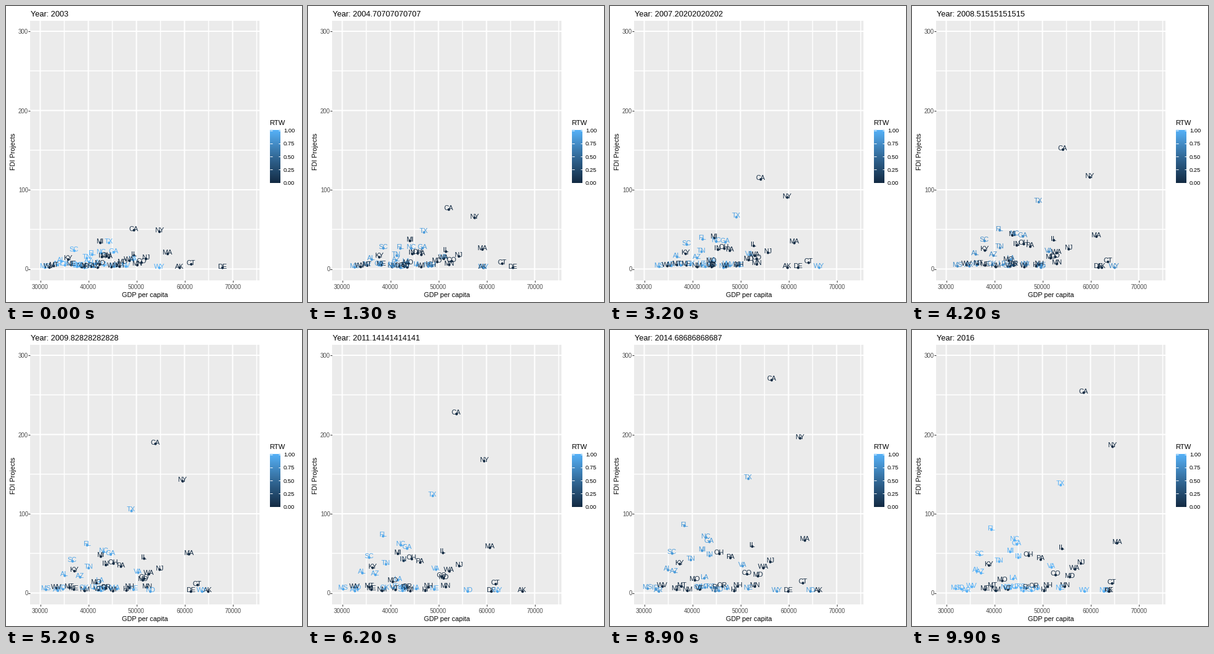
Recreate the animation shown at these times as a matplotlib script. Size 480 by 480 pixels, loop 10000 ms.

```python
import numpy as np
import matplotlib.pyplot as plt
from matplotlib.animation import FuncAnimation
from matplotlib.colors import LinearSegmentedColormap
from matplotlib.patches import Rectangle

plt.rcParams["font.family"] = "Liberation Sans"
SIZE, DPI, FRAMES = 480, 100, 100
PT = 72 / DPI  # points per pixel
FIRST, SPAN = 2003, 13
KEYS = (2003, 2007.2, 2011.14, 2013.24, 2016)

# First and last GDP per capita (thousands), first and peak projects
HUBS = {
    "CA": (49.5, 58.6, 49, 286),
    "NY": (54.8, 64.6, 47, 207),
    "TX": (44.3, 53.8, 33, 153),
    "FL": (40.8, 39.4, 18, 90),
    "NC": (42.7, 44.2, 20, 74),
    "MA": (56.5, 65.5, 19, 70),
    "GA": (45.3, 44.7, 21, 68),
    "IL": (49.5, 54.1, 17, 62),
    "MI": (42.5, 43.3, 33, 55),
    "SC": (37.1, 37.0, 23, 52),
    "CT": (61.4, 64.5, 6, 13),
}
# GDP at KEYS for states that leave the common trend
ROAMERS = {
    "AK": (59, 59.8, 67.5, 69, 63.9),
    "WY": (54.8, 66.4, 62.3, 56.3, 58.8),
    "DE": (67.9, 62, 61, 55.7, 63.8),
    "ND": (39.2, 46.5, 56.1, 66.5, 62.8),
}
# Everyone else, poorest to richest, in the first and last year
POOR_TO_RICH = (
    "MS WV MT AR AL OK KY ME ID SD UT NM OR TN AZ RI KS LA VT MO IN IA OH PA "
    "WI NE HI NH MD NV WA VA MN CO NJ".split(),
    "MS ID AR WV AL AZ ME KY MT NM TN MO NV VT OK LA UT IN KS WI RI OH SD OR "
    "IA PA HI NH VA CO NE MN MD WA NJ".split(),
)
BUSY = "OH IN PA TN NJ KY VA WA AL AZ CO MD LA MO".split()  # by peak projects

RTW_SINCE = dict.fromkeys(
    "AL AZ AR FL GA ID IA KS LA MS NE NV NC ND OK SC SD TN TX UT VA WY".split(),
    1990)
RTW_SINCE.update(IN=2012, MI=2013, WI=2015, WV=2016)

CMAP = LinearSegmentedColormap.from_list("rtw", ["#132B43", "#336A98", "#56B1F7"])


def spread(order, state, mid, slope, tail):
    u = 2 * order.index(state) / (len(order) - 1) - 1
    return mid + slope * u + tail * u ** 3


def build():
    rng = np.random.default_rng(4)
    states = {}
    for s in sorted([*HUBS, *ROAMERS, *POOR_TO_RICH[0]]):
        if s in HUBS:
            states[s] = HUBS[s]
            continue
        if s in ROAMERS:
            gdp = (0, 0)
        else:
            gdp = (spread(POOR_TO_RICH[0], s, 41.5, 7.5, 3),
                   spread(POOR_TO_RICH[1], s, 45, 9, 4))
        if s in BUSY:
            i = BUSY.index(s)
            fdi = (16 - 0.8 * i, 52 - 2.7 * i)
        else:
            fdi = (rng.uniform(1, 5), rng.uniform(1, 9))
        if s in ROAMERS:
            fdi = (1.5, 2)
        states[s] = (*gdp, *fdi)
    return states


STATES = build()


def place(state, year):
    g0, g1, f0, peak = STATES[state]
    t = (year - FIRST) / SPAN
    if state in ROAMERS:
        gdp = np.interp(year, KEYS, ROAMERS[state])
    else:
        gdp = g0 + (g1 - g0) * t + 2 * np.sin(2 * np.pi * t)  # boom and bust
    growth = np.interp(year, (2003, 2007.2, 2013.24, 2016), (0, 0.27, 1, 0.86))
    return gdp, f0 + (peak - f0) * growth


def rtw(state, year):
    level = np.clip(year - RTW_SINCE.get(state, 3000) + 1, 0, 1)
    return level * (1 - 0.5 * abs(year - round(year)))


def px(gdp):
    return 55.5 + (gdp - 30) * 7.8


def py(fdi):
    return 426.5 - fdi * 1.285


fig = plt.figure(figsize=(SIZE / DPI, SIZE / DPI), dpi=DPI, facecolor="white")
ax = fig.add_axes([0, 0, 1, 1])
ax.axis("off")


def text(x, y, s, size, color="black", ha="left", va="center", **kw):
    return ax.text(x, y, s, fontsize=size * PT, color=color, ha=ha, va=va, **kw)


def line(xs, ys, color, width=1, **kw):
    ax.plot(xs, ys, color=color, lw=width * PT, solid_capstyle="butt",
            zorder=1, **kw)


L, R, T, B = 39, 411, 24, 445
ax.add_patch(Rectangle((L, T), R - L, B - T, fc="#EBEBEB", lw=0, zorder=0))

for k in range(30, 76, 5):
    x = px(k)
    major = k % 10 == 0
    line([x, x], [T, B], "white", 2 if major else 1.5, snap=False)
    if major:
        line([x, x], [B, B + 3], "#333333")
        text(x, 456, f"{k}000", 9.7, "#4D4D4D", "center")
for n in range(0, 301, 50):
    y = py(n)
    major = n % 100 == 0
    line([L, R], [y, y], "white", 2 if major else 1.5, snap=False)
    if major:
        line([L - 3, L], [y, y], "#333333")
        text(36, y, str(n), 9.7, "#4D4D4D", "right", "center_baseline")

text(225, 469, "GDP per capita", 10.9, ha="center")
text(12, 236, "FDI Projects", 10.9, ha="center", rotation=90)

# Legend
text(427, 190, "RTW", 11.2)
ax.imshow(np.linspace(1, 0, 86)[:, None], cmap=CMAP, aspect="auto",
          extent=(428, 445, 287, 201), interpolation="bilinear", zorder=1)
for v in np.linspace(0, 1, 5):
    y = 286.5 - 85 * v
    for x in (428, 441.5):
        line([x, x + 3.5], [y, y], "white")
    text(450, y, f"{v:.2f}", 9.5, va="center_baseline")

title = text(40, 17, "", 12.7, va="baseline")
dots = ax.scatter(np.zeros(len(STATES)), np.zeros(len(STATES)),
                  s=(4.2 * PT) ** 2, lw=0, zorder=2)
labels = [text(0, 0, s, 11, ha="center", va="baseline", zorder=3) for s in STATES]

ax.set_xlim(0, SIZE)
ax.set_ylim(SIZE, 0)


def update(i):
    year = FIRST + SPAN * i / (FRAMES - 1)
    title.set_text(f"Year: {year:.15g}")
    spots, colors = [], []
    for state, label in zip(STATES, labels):
        gdp, fdi = place(state, year)
        x, y = px(gdp), py(fdi)
        color = CMAP(float(rtw(state, year)))
        label.set_position((x - 0.5, y + 1))
        label.set_color(color)
        spots.append((x, y))
        colors.append(color)
    dots.set_offsets(spots)
    dots.set_facecolors(colors)
    return [title, dots, *labels]


anim = FuncAnimation(fig, update, frames=FRAMES, interval=100,
                     repeat=True, repeat_delay=0)
plt.show()
```
